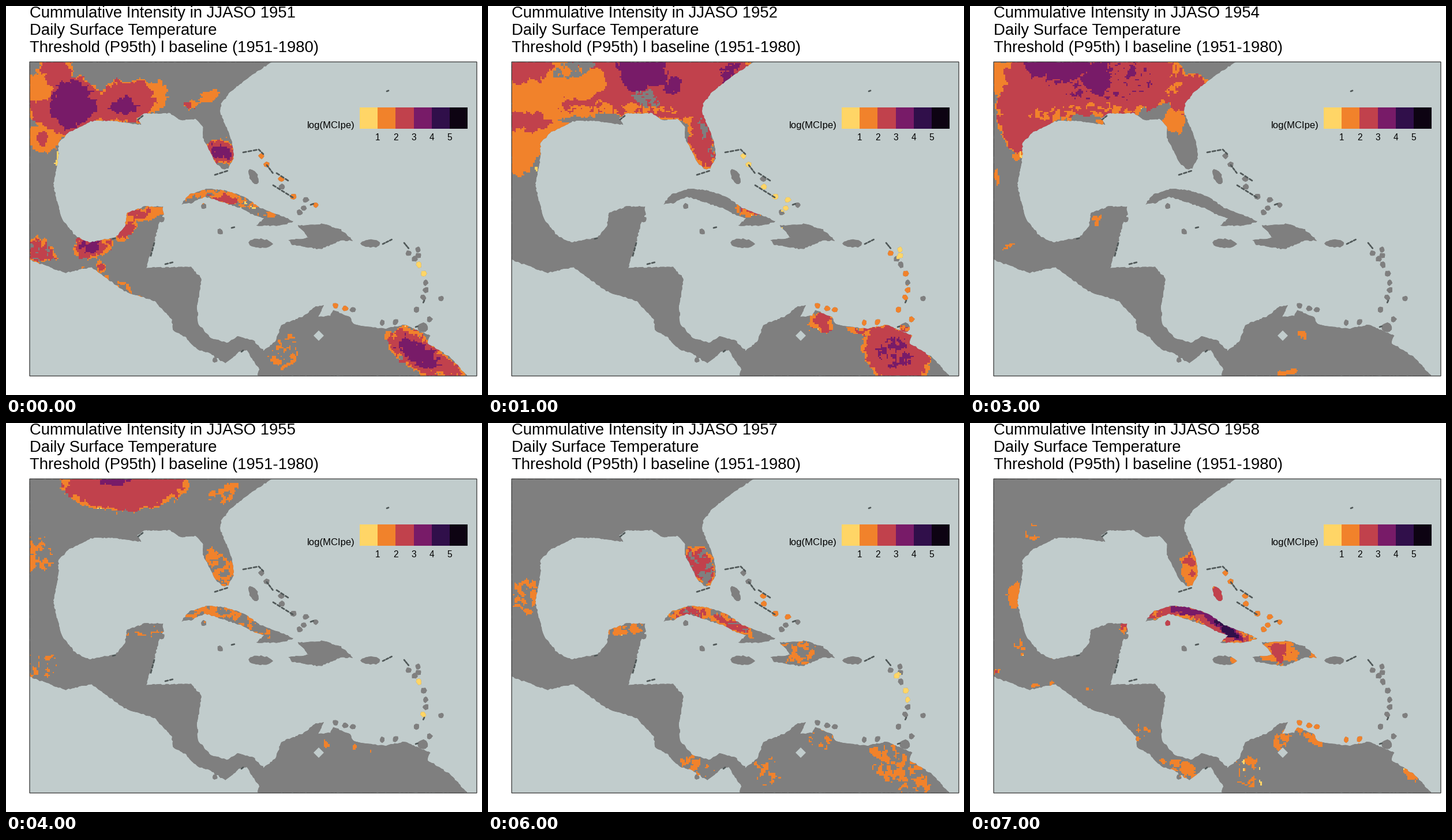
Write a matplotlib script that moves like this. It is 825 px wide and 675 px high and loops after 8000 ms.

```python
import numpy as np
import matplotlib.pyplot as plt
from matplotlib.animation import FuncAnimation
from matplotlib.colors import ListedColormap
from matplotlib.patches import PathPatch, RegularPolygon, Rectangle
from matplotlib.path import Path

W, H, DPI = 825, 675, 100
LEFT, TOP, RIGHT, BOTTOM = 41, 97, 816, 642
CELL = 2.5
SEA, LAND, ISLET = "#c1cccc", "#7f7f7f", "#505858"
SCALE = ["#ffd566", "#f1822b", "#c1414c", "#781b68", "#300f4a", "#0d0312"]
GREY, YELLOW, ORANGE, RED, PURPLE, DARK = range(6)
FIRST = 1951

# key points of the mainland outline
ATLANTIC = [
    (41, 97), (461, 97), (437, 112), (412, 130), (386, 152), (373, 170), (371, 185),
    (384, 215), (394, 245), (394, 265), (385, 282), (376, 284), (362, 270), (350, 246),
    (341, 228), (342, 210), (328, 196), (303, 198), (285, 186), (240, 187), (227, 195),
    (234, 206), (215, 203), (180, 199), (147, 200), (110, 219), (91, 237), (91, 262),
    (82, 310), (89, 343), (98, 371), (121, 400), (143, 410), (190, 402), (206, 383),
    (209, 360), (240, 348), (272, 348), (273, 362), (264, 380), (256, 413), (243, 454)]
SOUTH = [
    (320, 453), (339, 473), (331, 520), (333, 552), (355, 576), (383, 585), (402, 573),
    (428, 580), (447, 598), (468, 581), (477, 553), (517, 538), (537, 521), (550, 520),
    (541, 540), (562, 537), (567, 527), (596, 540), (603, 553), (655, 560), (690, 553),
    (735, 572), (730, 585), (768, 608), (800, 642), (436, 642), (439, 630), (418, 598),
    (404, 600), (380, 620), (352, 602), (330, 595), (310, 574), (289, 562), (288, 545),
    (258, 512), (205, 495), (148, 453), (103, 463), (65, 449), (41, 440)]
CUBA = [(304, 344), (318, 327), (350, 317), (385, 321), (415, 332), (440, 350), (485, 367),
        (498, 374), (475, 381), (433, 381), (447, 369), (430, 363), (410, 352), (375, 340),
        (345, 331), (320, 342)]
HISPANIOLA = [(506, 381), (550, 378), (580, 388), (601, 407), (580, 407), (545, 422),
              (495, 414), (490, 406), (525, 402)]

# centre x, y, radii, tilt
OVALS = [(441, 412, 21, 8, 5), (632, 412, 17, 7, 0), (429, 296, 7, 14, -25), (723, 558, 9, 8, 0)]

CHAINS = {
    "bahamas": [(443, 260), (452, 275), (477, 300), (478, 314), (498, 331), (520, 336),
                (537, 345), (509, 358), (516, 351)],
    "antilles": [(728 - 30 * ((y - 485) / 56) ** 2, y)
                 for y in (429, 439, 449, 464, 480, 493, 506, 527)],
    "leeward": [(714, 423), (715, 433)],
    "curacao": [(571, 520), (588, 525), (601, 527)],
    "margarita": [(652, 550), (675, 548), (734, 544)],
    "youth": [(343, 347)],
    "lone": [(371, 392), (754, 508), (362, 614), (270, 370)],
}

# rows of dark islets: start, end, count
ROWS = [(362, 293, 387, 285, 3), (411, 254, 438, 249, 3), (438, 249, 448, 259, 2),
        (452, 276, 464, 292, 3), (469, 290, 492, 305, 3), (463, 311, 500, 334, 5),
        (528, 345, 536, 342, 1), (391, 385, 399, 383, 1), (276, 448, 292, 444, 2),
        (257, 411, 250, 437, 3), (653, 413, 671, 404, 3), (690, 411, 699, 422, 3),
        (229, 197, 239, 189, 2), (185, 404, 192, 402, 1), (408, 600, 413, 596, 1),
        (660, 148, 665, 146, 1), (725, 511, 722, 517, 1), (710, 557, 716, 555, 1)]

# areas that warm up again and again: centre x, y, radii, tilt
PLACES = {
    "florida": (370, 250, 38, 20, 60),
    "west cuba": (352, 328, 45, 12, -5),
    "east cuba": (425, 348, 45, 12, 28),
    "hispaniola": (535, 398, 32, 20, 0),
    "yucatan": (238, 358, 38, 12, -5),
    "tabasco": (148, 417, 36, 20, -5),
    "oaxaca": (60, 425, 28, 22, 0),
    "pacific": (180, 480, 65, 9, 28),
    "belize": (237, 437, 16, 26, 10),
    "honduras": (317, 476, 20, 24, 0),
    "costa rica": (360, 597, 38, 14, 25),
    "magdalena": (482, 603, 24, 27, 0),
    "maracaibo": (545, 548, 25, 12, -50),
    "coro": (578, 547, 24, 16, 0),
    "orinoco": (712, 602, 64, 30, 38),
}

GX, GY = np.meshgrid(np.arange(LEFT, RIGHT, CELL) + CELL / 2,
                     np.arange(TOP, BOTTOM, CELL) + CELL / 2)


def distance(gx, gy, x, y, rx, ry, tilt):
    """1 on the rim of a tilted ellipse, 0 at its centre."""
    c, s = np.cos(np.radians(tilt)), np.sin(np.radians(tilt))
    dx, dy = gx - x, gy - y
    return np.hypot((dx * c + dy * s) / rx, (dy * c - dx * s) / ry)


def noise(rng, step):
    """Smooth random field, one knot every `step` cells."""
    rows, cols = GX.shape
    knots = rng.normal(size=(rows // step + 2, cols // step + 2))
    xs, ys = np.arange(cols) / step, np.arange(rows) / step
    wide = np.array([np.interp(xs, np.arange(len(k)), k) for k in knots])
    return np.array([np.interp(ys, np.arange(len(k)), k) for k in wide.T]).T


class Heat:
    """Intensity classes on a grid, built from ragged ellipses."""
    RING = 8  # pixels from one class to the next

    def __init__(self, seed):
        self.rng = np.random.default_rng(seed)
        self.x, self.y = (g + 2.2 * noise(self.rng, 2) + 3.5 * noise(self.rng, 6)
                          for g in (GX, GY))
        self.grain = noise(self.rng, 2) + 0.8 * noise(self.rng, 4)
        self.grid = np.zeros(GX.shape, int)

    def shape(self, x, y, rx, ry, tilt, cover):
        depth = (1 - distance(self.x, self.y, x, y, rx, ry or rx, tilt)) * min(rx, ry or rx)
        inside = (depth > 0) & (self.grain <= np.quantile(self.grain, cover))
        return depth, inside

    def blob(self, level, x, y, rx, ry=None, tilt=0, cover=1):
        """Warm spot whose class rises inwards up to `level`."""
        depth, inside = self.shape(x, y, rx, ry, tilt, cover)
        rise = np.floor(2.6 + depth / self.RING + 0.3 * self.grain).astype(int)
        rise = np.clip(rise, YELLOW, level)
        self.grid = np.where(inside, np.maximum(self.grid, rise), self.grid)

    def cut(self, level, x, y, rx, ry=None, tilt=0, cover=1):
        """Flat patch that replaces what lies below."""
        self.grid[self.shape(x, y, rx, ry, tilt, cover)[1]] = level

    def at(self, place, level, cover=1):
        self.blob(level, *PLACES[place], cover=cover)

    def specks(self, level, n, x, y, rx, ry):
        for u, v, r in self.rng.uniform(-1, 1, (n, 3)):
            self.blob(level, x + u * rx, y + v * ry, 3.5 + r)

    def tint(self, chain, level, share=1):
        for x, y in CHAINS[chain]:
            if self.rng.random() < share:
                self.grid[np.hypot(GX - x, GY - y) < 8] = level


def y1951(h):
    h.blob(ORANGE, 60, 148, 30, 28)
    h.blob(RED, 105, 172, 70, 52)
    h.blob(RED, 85, 110, 34, 26)
    h.blob(RED, 205, 168, 62, 38, -8)
    h.blob(PURPLE, 115, 172, 50, 50)
    h.blob(PURPLE, 207, 172, 38, 28, -20)
    h.blob(ORANGE, 262, 158, 19, 28)
    h.cut(ORANGE, 55, 145, 24, 20)
    h.cut(ORANGE, 62, 230, 34, 22)
    h.cut(RED, 66, 230, 9, 12)
    h.blob(ORANGE, 352, 155, 20, 11, -25)
    h.blob(RED, 320, 169, 14, 7)
    h.blob(PURPLE, 372, 252, 27, 23)
    h.blob(YELLOW, 89, 265, 5, 14)
    h.at("west cuba", ORANGE, .55)
    h.blob(RED, 380, 333, 28, 9, 10)
    h.at("east cuba", ORANGE, .45)
    h.at("yucatan", ORANGE)
    h.blob(RED, 230, 357, 30, 12, -10)
    h.blob(RED, 205, 385, 14, 26, 25)
    h.at("tabasco", PURPLE)
    h.at("oaxaca", RED, .75)
    h.at("pacific", ORANGE, .4)
    h.blob(RED, 165, 452, 9)
    h.at("magdalena", ORANGE, .55)
    h.at("orinoco", PURPLE)
    h.blob(RED, 765, 622, 40, 14, 40)
    h.specks(YELLOW, 5, 440, 348, 45, 20)
    h.tint("bahamas", ORANGE, .6)
    h.tint("antilles", YELLOW, .25)
    h.tint("curacao", ORANGE, .7)


def y1952(h):
    h.blob(ORANGE, 95, 165, 95, 80)
    h.blob(ORANGE, 50, 240, 42, 55)
    h.blob(RED, 300, 130, 175, 70)
    h.blob(RED, 60, 108, 60, 28)
    h.blob(RED, 68, 202, 50, 22)
    h.cut(ORANGE, 150, 130, 55, 30)
    h.blob(RED, 160, 172, 45, 16)
    h.blob(PURPLE, 268, 108, 58, 48)
    h.blob(PURPLE, 318, 135, 30, 24, -20)
    h.blob(PURPLE, 420, 116, 48, 22, -38, .7)
    h.cut(ORANGE, 235, 180, 95, 9, 0, .7)
    h.cut(GREY, 272, 160, 22, 12, 35, .8)
    h.cut(GREY, 150, 110, 38, 14, -15, .7)
    h.cut(GREY, 180, 202, 60, 10)
    h.blob(RED, 370, 205, 24, 38)
    h.at("florida", RED)
    h.cut(GREY, 380, 232, 7, 38, -18, .5)
    h.blob(RED, 452, 357, 24, 9, 20, .8)
    h.blob(YELLOW, 512, 395, 4, 12)
    h.at("coro", RED)
    h.blob(RED, 680, 562, 58, 11)
    h.blob(RED, 708, 605, 62, 46, 25)
    h.blob(PURPLE, 705, 602, 44, 38, 25, .6)
    h.specks(YELLOW, 5, 80, 255, 10, 35)
    h.tint("bahamas", YELLOW, .6)
    h.tint("antilles", ORANGE, .7)
    h.tint("leeward", YELLOW)
    h.tint("curacao", ORANGE)
    h.tint("margarita", ORANGE)


def y1953(h):
    h.blob(ORANGE, 65, 275, 32, 75)
    h.blob(RED, 50, 140, 32, 95)
    h.blob(RED, 75, 198, 32, 32)
    h.blob(RED, 62, 350, 40, 48)
    h.cut(GREY, 55, 278, 12, 10)
    h.blob(RED, 190, 138, 64, 66)
    h.blob(RED, 250, 112, 34, 20)
    h.cut(ORANGE, 200, 130, 10, 30, 15)
    h.cut(ORANGE, 262, 122, 14, 16)
    h.cut(ORANGE, 183, 186, 16, 14)
    h.blob(ORANGE, 118, 190, 38, 26, 0, .6)
    h.blob(PURPLE, 165, 110, 27, 21, 25)
    h.blob(ORANGE, 372, 103, 20, 10, 25, .8)
    h.blob(ORANGE, 308, 154, 7)
    h.blob(ORANGE, 226, 204, 8)
    h.blob(PURPLE, 132, 413, 40, 28, 10)
    h.at("oaxaca", ORANGE, .35)
    h.at("pacific", RED, .6)
    h.blob(RED, 105, 450, 65, 9, 3, .6)
    h.blob(ORANGE, 252, 354, 19, 8, 0, .8)
    h.blob(ORANGE, 226, 378, 5)
    h.at("belize", RED)
    h.at("honduras", ORANGE)
    h.blob(ORANGE, 290, 495, 10)
    h.blob(RED, 299, 510, 8, 12)
    h.at("maracaibo", ORANGE, .7)
    h.blob(RED, 557, 552, 9, 13)
    h.blob(PURPLE, 702, 598, 64, 30, 38)
    h.blob(ORANGE, 640, 561, 28, 6, 0, .6)
    h.specks(YELLOW, 5, 640, 600, 120, 30)
    h.tint("curacao", ORANGE, .7)
    h.tint("margarita", ORANGE, .6)


def y1954(h):
    h.blob(ORANGE, 58, 125, 28, 30)
    h.blob(ORANGE, 354, 198, 18, 20)
    h.blob(RED, 212, 125, 160, 72)
    h.blob(RED, 95, 190, 48, 70, -8)
    h.blob(RED, 375, 150, 42, 32, -40)
    h.blob(PURPLE, 152, 100, 76, 42)
    h.blob(PURPLE, 222, 128, 36, 44)
    h.blob(PURPLE, 230, 130, 125, 48, 0, .25)
    h.cut(ORANGE, 200, 186, 100, 13, -3, .4)
    h.cut(ORANGE, 357, 125, 12, 28, 0, .5)
    h.cut(GREY, 205, 198, 32, 9)
    h.blob(ORANGE, 227, 205, 9, 5)
    h.blob(ORANGE, 80, 262, 8)
    h.blob(YELLOW, 90, 259, 5)
    h.blob(ORANGE, 46, 297, 4, 12)
    h.blob(ORANGE, 219, 371, 9, 5)
    h.blob(ORANGE, 575, 567, 4, 8)
    h.blob(ORANGE, 546, 641, 18, 7)
    h.specks(ORANGE, 4, 78, 422, 18, 8)


def y1955(h):
    h.blob(RED, 205, 108, 110, 45)
    h.blob(PURPLE, 185, 98, 45, 26)
    h.blob(ORANGE, 55, 230, 30, 34, 0, .6)
    h.blob(ORANGE, 372, 125, 32, 15, -25, .5)
    h.at("florida", ORANGE, .55)
    h.at("west cuba", ORANGE, .55)
    h.at("east cuba", ORANGE, .45)
    h.at("yucatan", ORANGE, .4)
    h.at("oaxaca", ORANGE, .25)
    h.specks(ORANGE, 4, 590, 580, 50, 30)
    h.tint("antilles", YELLOW, .2)


def y1956(h):
    h.blob(ORANGE, 160, 115, 102, 70)
    h.blob(ORANGE, 108, 185, 34, 25, -15)
    h.blob(ORANGE, 278, 108, 28, 24, -40)
    h.blob(RED, 168, 112, 95, 64)
    h.blob(PURPLE, 128, 108, 50, 48)
    h.blob(PURPLE, 200, 130, 34, 19)
    h.blob(ORANGE, 363, 125, 16, 6, -25, .7)
    h.blob(ORANGE, 404, 116, 17, 8, -25)
    h.at("florida", RED)
    h.blob(RED, 375, 235, 18, 30, -20)
    h.blob(PURPLE, 383, 267, 18, 22)
    h.cut(ORANGE, 351, 222, 11, 18)
    h.cut(GREY, 378, 215, 8, 10)
    h.at("west cuba", RED)
    h.at("east cuba", RED)
    h.cut(PURPLE, 358, 325, 32, 5, -3)
    h.cut(PURPLE, 425, 350, 14, 7, 40)
    h.blob(ORANGE, 430, 294, 12, 16)
    h.at("yucatan", ORANGE, .45)
    h.blob(ORANGE, 269, 356, 7, 10)
    h.specks(YELLOW, 3, 460, 366, 20, 6)
    h.tint("youth", ORANGE)


def y1957(h):
    h.at("florida", RED, .65)
    h.at("west cuba", RED, .7)
    h.at("east cuba", RED, .8)
    h.at("hispaniola", ORANGE, .45)
    h.at("yucatan", ORANGE, .4)
    h.blob(ORANGE, 65, 300, 22, 32, 0, .5)
    h.at("costa rica", ORANGE, .3)
    h.at("magdalena", ORANGE, .3)
    h.at("coro", ORANGE, .5)
    h.at("orinoco", ORANGE, .45)
    h.tint("bahamas", ORANGE, .5)
    h.tint("antilles", YELLOW, .3)


def y1958(h):
    h.blob(ORANGE, 109, 190, 13, 14, 0, .45)
    h.blob(ORANGE, 78, 299, 11, 24)
    h.blob(ORANGE, 384, 260, 16, 27)
    h.blob(RED, 381, 234, 14, 12)
    h.blob(RED, 385, 258, 9)
    h.at("west cuba", RED)
    h.blob(RED, 430, 350, 66, 22, 28)
    h.blob(ORANGE, 485, 376, 16, 10)
    h.cut(PURPLE, 378, 327, 30, 7, 10)
    h.cut(PURPLE, 438, 354, 46, 10, 32)
    h.cut(DARK, 447, 360, 26, 7, 30)
    h.blob(RED, 429, 295, 16, 22)
    h.at("hispaniola", ORANGE, .75)
    h.blob(RED, 535, 398, 18, 15)
    h.blob(ORANGE, 457, 414, 7)
    h.blob(ORANGE, 597, 405, 6)
    h.blob(RED, 270, 357, 7, 11)
    h.blob(RED, 46, 432, 6)
    h.blob(ORANGE, 86, 390, 10, 14, 0, .35)
    h.blob(ORANGE, 298, 540, 14, 16, 0, .4)
    h.at("costa rica", ORANGE, .45)
    h.blob(ORANGE, 380, 602, 18, 9, 45)
    h.blob(ORANGE, 596, 550, 20, 8, 35)
    h.blob(ORANGE, 570, 531, 8)
    h.at("maracaibo", ORANGE, .35)
    h.at("magdalena", ORANGE, .25)
    h.blob(ORANGE, 765, 610, 14, 9, 45)
    h.specks(ORANGE, 5, 150, 425, 60, 35)
    h.specks(YELLOW, 4, 515, 600, 60, 30)
    h.tint("bahamas", ORANGE)
    h.tint("youth", RED)
    h.tint("curacao", ORANGE)
    h.tint("margarita", ORANGE, .5)


SEASONS = [y1951, y1952, y1953, y1954, y1955, y1956, y1957, y1958]


def season_grid(i):
    h = Heat(FIRST + i)
    SEASONS[i](h)
    return h.grid


def coast(pts, rng):
    """Closed outline with small steps along every edge."""
    pts = np.array(pts, float)
    out = []
    for a, b in zip(pts, np.roll(pts, -1, axis=0)):
        n = max(1, int(np.hypot(*(b - a)) // 3))
        step = a + (b - a) * (np.arange(n) / n)[:, None]
        out.append(step + rng.uniform(-1, 1, step.shape))
    out = np.clip(np.vstack(out), (LEFT, TOP), (RIGHT, BOTTOM))
    return Path(np.vstack([out, out[:1]]), closed=True)


def oval(x, y, rx, ry, tilt=0, n=8):
    t, a = np.arange(n) * 2 * np.pi / n, np.radians(tilt)
    u, v = rx * np.cos(t), ry * np.sin(t)
    return np.column_stack([x + u * np.cos(a) - v * np.sin(a), y + u * np.sin(a) + v * np.cos(a)])


plt.rcParams["font.family"] = "Liberation Sans"
fig = plt.figure(figsize=(W / DPI, H / DPI), dpi=DPI, facecolor="white")
ax = fig.add_axes([0, 0, 1, 1])
ax.axis("off")


def label(x, y, text, px, **kw):
    return ax.text(x, y, text, fontsize=px * 72 / DPI, va="baseline", color="black", **kw)


def box(x, y, w, h, **kw):
    ax.add_patch(Rectangle((x, y), w, h, **kw))


box(LEFT, TOP, RIGHT - LEFT, BOTTOM - TOP, fc=SEA, ec="none", zorder=0)

rng = np.random.default_rng(7)
outlines = [ATLANTIC + SOUTH, CUBA, HISPANIOLA] + [oval(*o, n=12) for o in OVALS]
outlines += [oval(x, y, 5, 5) for chain in CHAINS.values() for x, y in chain]
land_path = Path.make_compound_path(*[coast(o, rng) for o in outlines])
land = ax.add_patch(PathPatch(land_path, fc=LAND, ec="none", zorder=1))

grids = [season_grid(i) for i in range(len(SEASONS))]
heat = ax.imshow(grids[0], cmap=ListedColormap([LAND] + SCALE), vmin=-0.5, vmax=6.5,
                 extent=(LEFT, RIGHT, BOTTOM, TOP), interpolation="nearest",
                 aspect="auto", zorder=2)
heat.set_clip_path(land)

ax.add_patch(RegularPolygon((542, 572), 4, radius=9, fc=SEA, ec="none", zorder=3))
for x0, y0, x1, y1, n in ROWS:
    for k in range(n):
        t = np.array([k, k + .6]) / n
        ax.plot(x0 + (x1 - x0) * t, y0 + (y1 - y0) * t, color=ISLET, lw=2,
                solid_capstyle="round", zorder=3)
box(LEFT, TOP, RIGHT - LEFT, BOTTOM - TOP, fc="none", ec="#333333", lw=0.9, snap=False, zorder=4)

STEP = 31.2
for k, color in enumerate(SCALE):
    box(613 + k * STEP, 175.5, STEP, 37.5, fc=color, ec="none", zorder=5)
    if k:
        label(613 + k * STEP, 233, str(k), 15.5, ha="center")
label(522, 212, "log(MCIpe)", 16.6)

title = label(41, 20, "", 27.5)
label(41, 50, "Daily Surface Temperature", 27.5)
label(41, 79.5, "Threshold (P95th) l baseline (1951-1980)", 27.5)

ax.set_xlim(0, W)
ax.set_ylim(H, 0)


def draw(i):
    heat.set_data(grids[i])
    title.set_text(f"Cummulative Intensity in JJASO {FIRST + i}")
    return heat, title


anim = FuncAnimation(fig, draw, frames=len(SEASONS), interval=1000, repeat=True)
plt.show()
```
